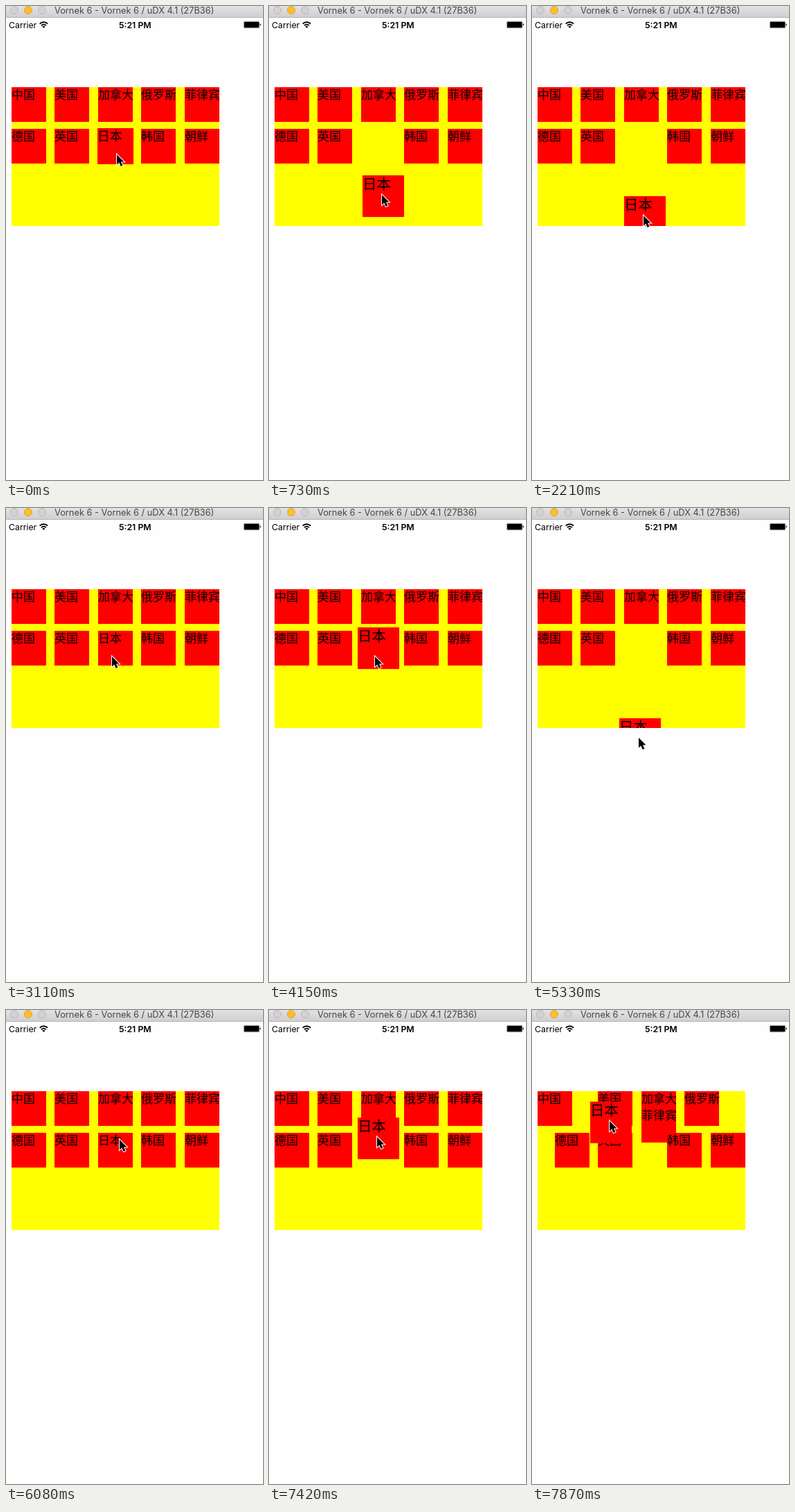
These frames come from a looping animation (371x683 px, 8000 ms). An HTML page:

```html
<!DOCTYPE html>
<html lang="zh">
<head>
<meta charset="utf-8">
<title>Drag to reorder</title>
<style>
  html, body { margin: 0; width: 100%; height: 100%; overflow: hidden; background: #fefefe; }
  body { position: relative; font-family: Inter, "Open Sans", sans-serif; }
  .bar {
    position: absolute; left: 0; top: 0; width: 371px; height: 16px;
    background: linear-gradient(#e3e1e3, #d0ced0); border-bottom: 1px solid #b8b6b8;
  }
  .bar i {
    position: absolute; top: 0; width: 10px; height: 10px; border-radius: 50%;
    background: #d3d1d3; border: 1px solid #b9b7b9;
  }
  .bar i.on { background: #fdbd2e; border-color: #e0a32a; }
  .label { position: absolute; white-space: pre; line-height: 16px; font-size: 12.3px; color: #000; }
  .title { left: 70px; top: -1px; font-size: 12.8px; color: #474647; }
  .board {
    position: absolute; left: 8px; top: 117px; width: 300px; height: 200px;
    background: #ff0; overflow: hidden; isolation: isolate;
  }
  .tile {
    position: absolute; left: 0; top: 0; width: 50px; height: 50px; background: #f00; color: #000;
    font: 17px/19px "Noto Sans CJK SC", "Noto Sans CJK", sans-serif; white-space: nowrap;
  }
  .tile.held { z-index: 1; }
  svg { position: absolute; left: 0; top: 0; z-index: 2; }
</style>
</head>
<body>
<div class="bar">
  <i style="left:6px"></i><i class="on" style="left:26px"></i><i style="left:46px"></i>
  <span class="label title">Vornek 6 - Vornek 6 / uDX 4.1 (27B36)</span>
</div>
<span class="label" style="left:4px;top:20px">Carrier</span>
<span class="label" style="left:163px;top:20px;font-weight:600">5:21 PM</span>
<div class="board" id="board"></div>
<svg width="371" height="683">
  <g fill="none" stroke="#000" stroke-width="1.9">
    <path d="M48.7 25.7a8 8 0 0 1 11.4 0M50.9 28.1a5 5 0 0 1 7 0"/>
    <path d="M54.4 31.8l-2.1-2.1a3 3 0 0 1 4.2 0z" fill="#000" stroke="none"/>
  </g>
  <rect x="343.3" y="22.3" width="22.4" height="9.4" rx="1.5" fill="none" stroke="#000" stroke-width=".5"/>
  <rect x="344" y="23" width="21" height="8" rx=".8"/>
  <path d="M366.5 25.3q1.3.3 1.3 1.7t-1.3 1.7z"/>
  <path id="cursor" d="M0 0V14.5L3.3 11.4L5.7 17L8.4 15.8L6 10.4H10.5Z"
        stroke="#fff" stroke-width="2" paint-order="stroke"/>
</svg>
<script>
// The screen updates in ticks; all moments below are tick numbers.
const LOOP = 8000, TICK = 148.8, LEAD = 30;
const HELD = 7, REORDER = 52.6;
const names = ['中国', '美国', '加拿大', '俄罗斯', '菲律宾', '德国', '英国', '日本', '韩国', '朝鲜'];

const origin = [160, 214];
const moves = [
  { from: 1, to: 5, tip: [163, 272] },
  { from: 5, to: 9, tip: [161, 289] },
  { from: 12, to: 15, tip: [161, 302] },
  { from: 18, to: 21, tip: [153, 214] },
  { from: 29, to: 32, tip: [147, 254] },
  { from: 32, to: 36, tip: [154, 331] },
  { from: 36, to: 41, tip: [164, 187] },
  { from: 49, to: 53, tip: [112, 160] }
];
const drags = [
  { lift: 0, grab: 1, drop: 17 },
  { lift: 27, grab: 30, drop: 37 },
  { lift: 47, grab: 50, drop: Infinity }
];

const board = document.getElementById('board');
const cursor = document.getElementById('cursor');
const tiles = names.map((name, i) => {
  const el = document.createElement('div');
  el.className = i === HELD ? 'tile held' : 'tile';
  el.textContent = name;
  return board.appendChild(el);
});

const clamp = v => Math.min(1, Math.max(0, v));
const smooth = p => p * p * (3 - 2 * p);
const mix = (a, b, p) => a + (b - a) * p;
const mixPoint = (a, b, p) => a.map((v, i) => mix(v, b[i], p));
const slot = i => [Math.floor(i % 5 * 62.5), Math.floor(i / 5) * 60];

function pointer(k) {
  const ease = (at, m) => mixPoint(at, m.tip, smooth(clamp((k - m.from) / (m.to - m.from))));
  return moves.reduce(ease, origin).map(Math.round);
}

// Lift grows the tile in place, grab ties it to the pointer, drop lets it settle back.
function grip(k) {
  const drag = drags.findLast(d => d.lift <= k);
  const left = clamp(drag.drop - k + .6);
  return { scale: 1 + .2 * Math.min(clamp(k - drag.lift + .2), left), follow: k < drag.grab ? 0 : left };
}

function place(el, [x, y], scale = 1) {
  el.style.transform = `translate(${Math.round(x)}px, ${Math.round(y)}px) scale(${scale})`;
}

function draw(t) {
  const k = Math.floor((t + LEAD) / TICK);
  const [px, py] = pointer(k);
  const { scale, follow } = grip(k);
  const moved = clamp(k - REORDER);
  tiles.forEach((el, i) => {
    const next = i > 0 && i < HELD ? i + 1 : i;
    if (i === HELD) {
      // the tile centre sits 2px beyond the pointer tip
      const carried = [px + 2 - 8 - 25, py + 2 - 117 - 25];
      place(el, mixPoint(slot(i), carried, follow), scale);
    } else {
      place(el, mixPoint(slot(i), slot(next), moved));
    }
  });
  cursor.setAttribute('transform', `translate(${px} ${py})`);
}

const start = performance.now();
function frame() {
  draw((performance.now() - start) % LOOP);
  requestAnimationFrame(frame);
}
frame();
</script>
</body>
</html>
```
